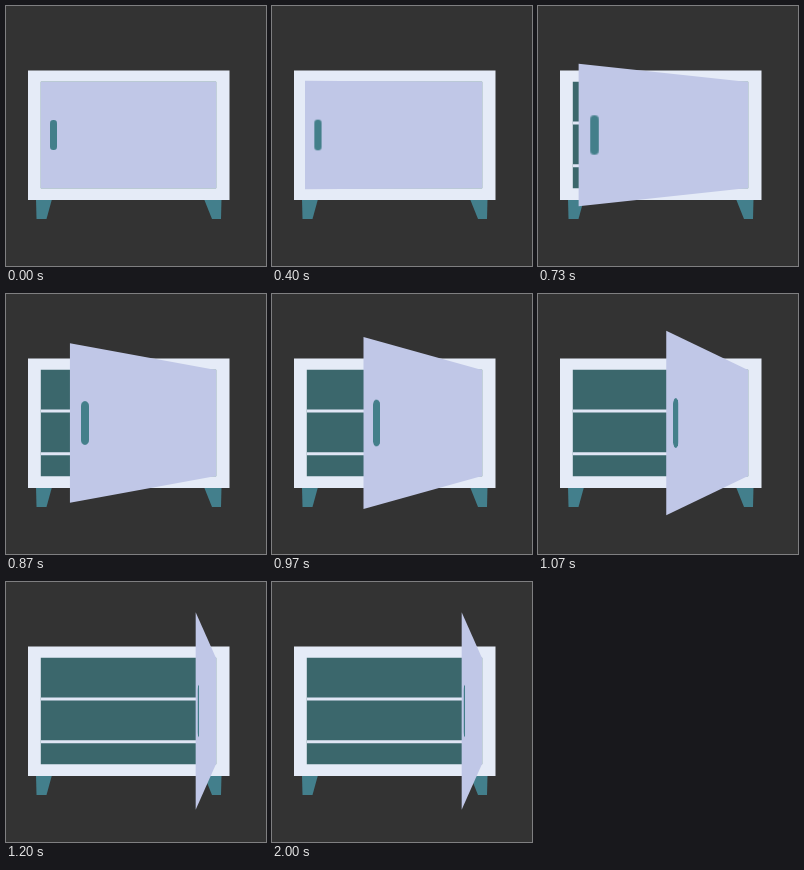
Animation, 260 px wide and 260 px high, one loop 4010 ms. Source, as an HTML page without scripts:

```html
<!DOCTYPE html>
<html lang="en">
<head>
<meta charset="utf-8">
<title>Cabinet door</title>
<style>
  html, body {
    margin: 0;
    width: 100%;
    height: 100%;
    overflow: hidden;
    background: #333;
  }
  .stage {
    position: relative;
    width: 260px;
    height: 260px;
    overflow: hidden;
    perspective: 361px;
    perspective-origin: 122.5px 129px;
  }
  .cabinet {
    position: absolute;
    inset: 0;
  }
  .door {
    position: absolute;
    left: 35px;
    top: 76px;
    width: 175px;
    height: 106px;
    background: #c0c7e7;
    transform-origin: 100% 50%;
    animation: open 4010ms infinite;
  }
  .door::after {
    content: "";
    position: absolute;
    left: 9px;
    top: 38px;
    width: 6.5px;
    height: 30px;
    border-radius: 3.25px;
    background: #437f8a;
  }
  /* the door swings at a constant rate, 30 steps a second */
  @keyframes open {
    0% { transform: rotateY(0deg); }
    9.03% { transform: rotateY(0deg); animation-timing-function: steps(25, end); }
    29.8%, 100% { transform: rotateY(72.9deg); }
  }
</style>
</head>
<body>
<div class="stage">
  <svg class="cabinet" width="260" height="260" viewBox="0 0 260 260">
    <g fill="#437f8c">
      <path d="M30 193H46L40.5 213H30.5Z"/>
      <path d="M198 193H215.5L215 213H206Z"/>
    </g>
    <path fill="#e5ebf7" d="M22 64.5H223.5V194H22Z"/>
    <path fill="#3b676c" d="M34.8 75.8H210.2V182.2H34.8Z"/>
    <path stroke="#e0e6f5" stroke-width="3" d="M35 117H210M35 159.7H210"/>
  </svg>
  <div class="door"></div>
</div>
</body>
</html>
```
